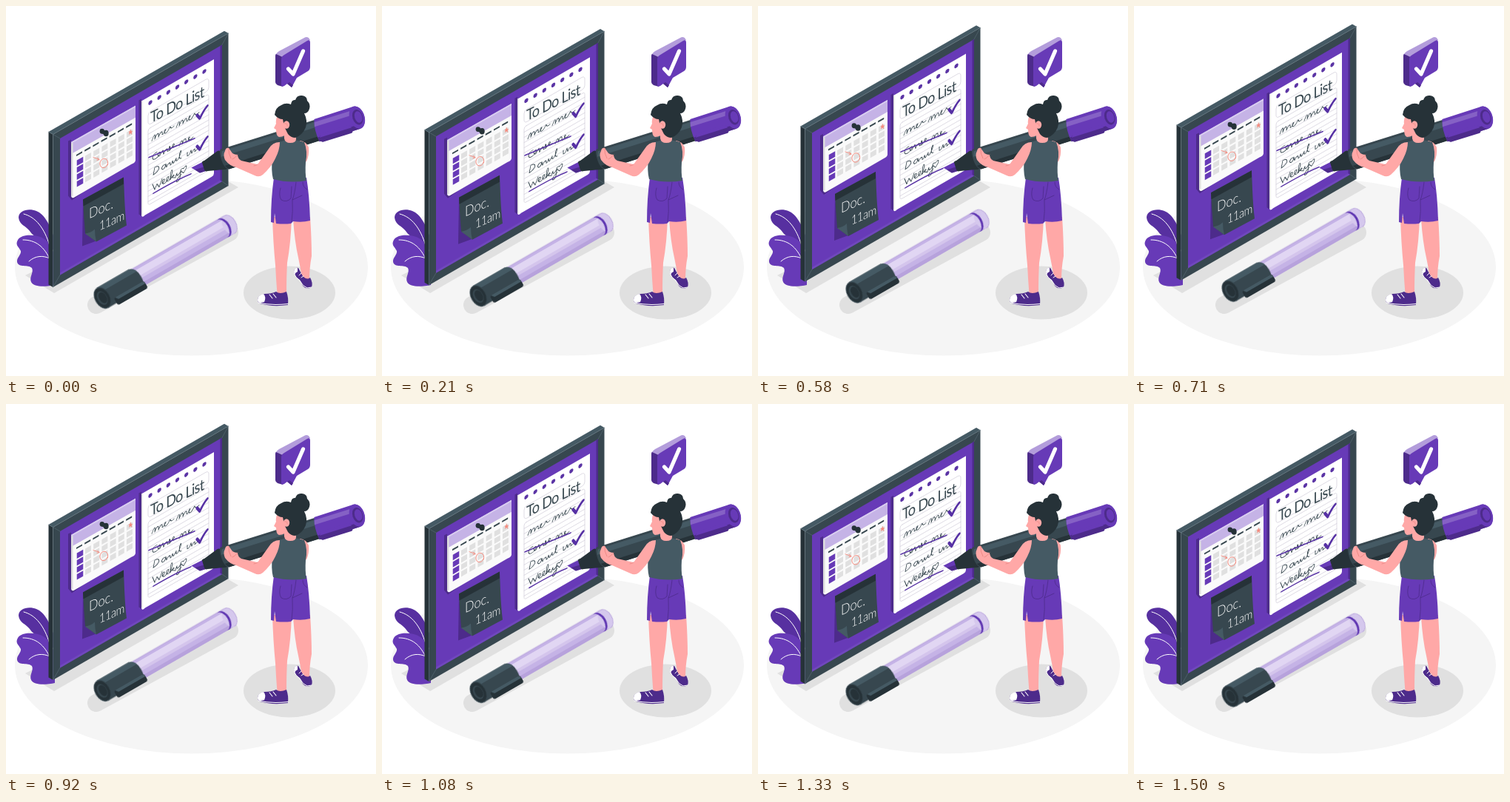
An HTML page for the animation above (1540 ms loop, 500 by 500 pixels).

```html
<!DOCTYPE html>
<html lang="en">
<head>
<meta charset="utf-8">
<title>To Do List</title>
<style>
html, body { margin: 0; height: 100%; overflow: hidden; background: #fff; }
svg { display: block; width: 100vw; height: 100vh; }
.float { animation: float 1540ms linear -40ms infinite; }
@keyframes float {
  50% { transform: translateY(-10px); }
}
.line { fill: none; stroke-linecap: round; stroke-linejoin: round; }
.p { fill: #673ab7; }
.pd { fill: #4d2b8b; }
.g { fill: #37474f; }
.gl { fill: #455a64; }
.gd { fill: #263238; }
.skin { fill: #ffa8a7; }
.shade { fill: #e0e0e0; }
.hand { font-family: Lato, "Open Sans", sans-serif; }
</style>
</head>
<body>
<svg viewBox="0 0 500 500">
  <!-- floor and shadows -->
  <ellipse cx="250.5" cy="353" rx="238.5" ry="119.5" fill="#f5f5f5"/>
  <path class="shade" d="M26 364L65 388L314 245L290 231Z"/>
  <path class="line" d="M122 404L302 306" stroke="#e0e0e0" stroke-width="24"/>
  <ellipse class="shade" cx="383" cy="387.5" rx="62" ry="36"/>

  <!-- plant -->
  <path d="M64 330C54 318 38 314 32 304C27 297 18 296 17 286C17 276 31 273 41 277C52 281 60 297 64 310Z" fill="#5730a0"/>
  <path class="p" d="M66 377C56 379 38 381 34 373C31 366 38 360 35 354C30 349 17 354 15 346C14 340 21 336 20 331C17 325 12 323 16 316C21 309 33 309 43 311C56 314 62 325 66 338Z"/>
  <path class="line" d="M24 281C40 285 52 300 59 324M23 316C40 316 52 325 60 344M31 345C40 337 50 337 59 341" stroke="#fff" stroke-width="1"/>

  <!-- board -->
  <g class="float">
    <path class="gd" d="M57.5 170.5L63.5 174V380.5L57.5 377Z"/>
    <path class="gl" d="M57.5 170.5L295 34.2L300.5 37.4L63.5 174Z"/>
    <path class="g" d="M63.5 174L300.5 37.4V243.5L63.5 380.5Z"/>
    <path class="line" d="M57.5 170.5L63.5 174L300.5 37.4M63.5 174V380.5M63.5 174L73 179.5M300.5 37.4L292 53M63.5 380.5L73 364M292 237.5L300.5 243.5" stroke="#60747e" stroke-width=".5"/>
    <path class="p" d="M73 179.5L292 53V237.5L73 364Z"/>
    <path d="M73 364L292 237.5L289.5 236L73 361Z" fill="#7048bd"/>
    <path class="pd" d="M292 53V237.5L289.5 236V54.5Z"/>

    <!-- calendar -->
    <path class="pd" d="M84 183L88 181V258L103 253L89 263L84 257Z"/>
    <g transform="matrix(1 -.567 0 1 88 184.5)">
      <path d="M0 0H87V74Q86 77 82 76L4 77Q1 77 0 73Z" fill="#fafafa"/>
      <path d="M0 0H87V16H0Z" fill="#c5b3e6"/>
      <path d="M0 0H87V2H0Z" fill="#d9cdf0"/>
      <path d="M0 2H2.5V74L0 73Z" fill="#ddd"/>
      <path d="M7 22H83" fill="none" stroke="#37474f" stroke-width="2.2" stroke-dasharray="8 3.2"/>
      <path d="M19 33H83M19 42.5H83M19 52H83M19 61.5H83" fill="none" stroke="#e0e0e0" stroke-width="7.2" stroke-dasharray="8 3.2"/>
      <path d="M12 29V66" fill="none" stroke="#673ab7" stroke-width="8.5" stroke-dasharray="7.5 2"/>
    </g>
    <g class="line" stroke="#f58a7d" stroke-width=".9">
      <ellipse cx="132.3" cy="213" rx="5.3" ry="6.3" transform="rotate(20 132.3 213)"/>
      <path d="M118 205L126 208M123.5 205.5L126 208L123 209"/>
      <path d="M168.3 167.5L169 170L171 169.5L169.5 171.5L170 174L168.3 172.3L166.3 174L167 171.5L165.8 170.5L167.5 170Z" fill="#f58a7d" stroke-width=".4"/>
    </g>
    <g class="gd">
      <ellipse cx="129.8" cy="169.8" rx="3.2" ry="3.4"/>
      <ellipse cx="135.2" cy="172.5" rx="3.5" ry="4.3"/>
      <path d="M129 167L136 170V176L130 173Z"/>
    </g>

    <!-- sticky note -->
    <path class="pd" d="M104 265L108 309L122 318L103 325Z"/>
    <path class="g" d="M104 262L159 232L160 258Q161 282 163 297L122 319L107 308Q105 285 104 262Z"/>
    <path class="gd" d="M104 262L159 232V241L104.5 271Z"/>
    <path class="gl" d="M107 308Q115 307 120 302Q120 311 122 319Z"/>
    <g class="hand" fill="#fff" font-weight="300">
      <text transform="matrix(.866 -.38 0 1 112 288)" font-size="19">Doc.</text>
      <text transform="matrix(.866 -.38 0 1 126 304)" font-size="17" letter-spacing="-.6">11am</text>
    </g>

    <!-- list -->
    <path class="pd" d="M179.5 128L183 126V284L188 288L179.5 282Z"/>
    <g transform="matrix(1 -.577 0 1 183 129)">
      <path d="M0 0H98V154Q98 157 95 157H5Q0 159 0 153Z" fill="#fff"/>
      <path d="M0 0H1.5V156L0 153Z" fill="#ddd"/>
      <path class="line" d="M12 9H86" stroke="#5b34a5" stroke-width="5.4" stroke-dasharray="0 12.17"/>
      <g class="line" stroke="#cfcbd8" stroke-width=".6">
        <rect x="9" y="21" width="82" height="17" rx="4"/>
        <rect x="9" y="43" width="82" height="103" rx="3"/>
        <path d="M9 50h82m-82 7h82m-82 7h82m-82 7h82m-82 7h82m-82 7h82m-82 7h82m-82 7h82m-82 7h82m-82 7h82m-82 7h82m-82 7h82m-82 7h82m-82 7h82"/>
      </g>
      <g class="line" stroke="#37474f" stroke-width=".9">
        <path d="M14 62C18 54 19 54 18 62C21 55 24 55 23 62C26 56 29 56 28 61C29 63 33 59 33 57C31 56 29 63 34 62C37 61 38 57 39 57C39 60 42 61 44 59M47 63C51 55 52 56 51 63C54 56 57 56 56 63C59 57 62 57 61 62C62 64 66 60 66 58C64 57 62 64 67 63C70 62 71 58 72 58C72 61 75 62 78 60"/>
        <path d="M21 81C14 80 13 89 19 89C25 89 27 83 24 83C21 83 22 89 25 88L29 83L30 89C33 83 36 83 35 88C37 90 40 85 38 83C36 87 42 87 38 89L42 86C45 86 45 83 43 83C41 84 42 90 47 87M51 90C54 83 56 84 55 90C58 83 61 84 60 90C61 92 66 88 65 86C62 85 63 93 70 89"/>
        <path d="M16 109L18 100C26 100 26 108 16 109M32 104C27 103 26 109 30 109C33 108 33 104 33 104L34 109C37 104 39 104 39 109C40 110 42 107 42 105L43 109C45 108 47 105 47 104C46 111 50 108 51 105C54 101 54 97 53 98C51 100 50 109 54 108M62 105L62 110C64 111 66 109 67 105L68 110C71 105 73 105 72 110L77 108"/>
        <path d="M15 121L18 130L21 124L24 130L28 121M28 127C32 127 32 123 30 123C27 124 28 130 32 129C36 128 38 123 36 123C33 123 33 129 37 129C41 126 43 117 41 117C39 117 39 125 39 129C42 124 44 124 44 126L41 127L46 130C47 128 47 126 48 125C47 130 51 130 53 125C53 134 51 138 48 137C46 135 50 131 54 130"/>
        <path d="M57 130C51 124 53 121 57 124C60 120 64 123 57 130Z"/>
      </g>
      <g class="line" stroke="#5630a4">
        <path d="M10 82Q42 87 72 92M16 134Q37 134 49 135T67 137" stroke-width="1.6"/>
        <path d="M75 62L79 69Q84 61 89 58M75 104L79 111Q84 103 89 100" stroke-width="3.4"/>
      </g>
      <text class="hand" transform="matrix(.866 .07 0 1 12 37)" font-size="21" letter-spacing="-.9" fill="#37474f">To Do List</text>
    </g>
  </g>

  <!-- marker on the floor -->
  <g class="float">
    <g transform="translate(130.5 395) rotate(-30)">
      <path d="M50 -14H198A9 14 0 0 1 198 14H50Z" fill="#c5b3e6"/>
      <path d="M50 -10H192Q197 -6 199 -1H50Z" fill="#e1d6f3"/>
      <path d="M50 -1H199V3H50Z" fill="#d4c5ec"/>
      <path d="M50 9H196L192 14H50Z" fill="#b7a2dc"/>
      <ellipse cx="198" rx="9" ry="14" fill="#d5c8ed"/>
      <path d="M50 -14H198A9 14 0 0 1 198 14" class="line" stroke="#ab94d3" stroke-width=".6"/>
      <path d="M186 -14A9 14 0 0 1 186 14H189A9 14 0 0 0 189 -14Z" fill="#5e35b1"/>
      <path class="g" d="M0 -15.5H50Q57 -14 59 -5Q61 7 56 15L0 15.5Z"/>
      <path class="gl" d="M0 -15.5H50Q56 -14 58 -8H4Z"/>
      <ellipse class="g" rx="10.5" ry="15.5"/>
      <ellipse class="gd" rx="9.5" ry="14.3"/>
      <ellipse class="g" cx="-.5" rx="6.5" ry="10"/>
      <ellipse class="gd" cx=".5" rx="5" ry="8"/>
      <rect class="gd" x="13" y="8" width="47" height="11" rx="3"/>
      <path class="gl" d="M15 8H57Q60 9 60 12H18Z"/>
    </g>
  </g>

  <!-- speech bubble -->
  <path class="pd" d="M364 67Q364 64 367 65L374 69V109L367 107Q364 105 364 103Z"/>
  <path d="M365 65Q366 63 369 61L403 43Q406 41 409 43L411 46L374 69Z" fill="#b39ddb"/>
  <path class="p" d="M372 72Q372 68 376 66L407 47Q411 45 411 49V82Q411 86 408 88L393 97L386 110L380 105L376 108Q372 110 372 106Z"/>
  <path class="pd" d="M380 105L386 110L388 107L383 103Z"/>
  <path class="line" d="M381.5 85L388 92L401.5 61" stroke="#fff" stroke-width="5.2"/>

  <!-- big marker -->
  <g transform="translate(251 220.500) rotate(-17.4)">
    <path class="p" d="M0 -2L18 -5V8L9 8Z"/>
    <path class="pd" d="M9 8L18 8V2L4 2Z"/>
    <path class="gd" d="M16 -5Q17 -6 20 -6L40 -13Q47 -14 48 0T44 14L20 9Q16 9 16 6Z"/>
    <path class="g" d="M45 -14H178V15H48Q42 12 42 0T45 -14Z"/>
    <path class="gl" d="M46 -11H178V-4H43Z"/>
    <path class="gd" d="M44 9H178V15H48Z"/>
    <path class="p" d="M178 -15Q173 0 176 16H234A10 15.5 0 0 0 234 -15.5Z"/>
    <path d="M177 -11H230V-5H175.5Z" fill="#8561c5"/>
    <path class="pd" d="M175.500 10H234V16H176Z"/>
    <ellipse class="p" cx="234" rx="10" ry="15.5"/>
    <ellipse class="pd" cx="235" rx="7" ry="10.5"/>
    <ellipse class="p" cx="236" rx="5" ry="8"/>
    <rect class="pd" x="178" y="8" width="45" height="10" rx="3"/>
    <path class="p" d="M180 6H219Q223 7 223 11H178Z"/>
  </g>

  <!-- legs -->
  <path class="skin" d="M388 285H411Q413 315 413 338Q410 353 410 371Q406 377 400 368Q398 354 395 340Q390 318 388 288Z"/>
  <path class="skin" d="M360 285H386Q385 320 380 347Q379 365 379 389H366.5Q365 370 364 350Q361 320 360 285Z"/>
  <path class="pd" d="M389 359Q390 353 395 354L401 365Q407 371 411 367Q415 374 413 380Q406 384 401 378L397 370Q390 367 389 359Z"/>
  <path d="M389 359Q390 353 394 354L394 359Q391 360 390 363Z" fill="#fff"/>
  <path class="line" d="M389 361Q391 367 397 371Q401 379 407 381L413 380M396 364L399 361M399 367L402 365" stroke="#fff" stroke-width="1"/>
  <path class="pd" d="M340 397Q340 391 349 389Q359 389 365 386Q370 390 379 386Q382 394 381 404Q360 407 343 402Q340 400 340 397Z"/>
  <path d="M340 397Q340 391 348 389Q352 393 349 400L343 401Q340 400 340 397Z" fill="#fff"/>
  <path class="line" d="M341 401Q358 405 381 402.500M356 390L360 395M361 389L365 394" stroke="#fff" stroke-width="1.100"/>

  <!-- shorts -->
  <path class="p" d="M362 232H406Q410 255 411 290Q400 293 388 291L385 294Q376 295 365 294L363 280L362 293L358 292Q358 260 362 232Z"/>
  <path class="line" d="M387 262Q388 278 386 292M371 246Q368 256 372 262Q379 266 385 260L386 244M392 238Q390 255 387 262L400 256M401 238Q401 245 407 248" stroke="#4d2b8b" stroke-width=".8"/>

  <!-- arms and body -->
  <path class="skin" d="M397 182Q406 183 409 191Q410 202 406 210L400 214Z"/>
  <path class="gl" d="M368 184Q385 178 403 184Q408 196 405 211Q404 226 406 236Q383 240 361 234Q358 223 360 205Q361 190 368 184Z"/>
  <path class="skin" d="M370 184Q360 184 355 193L340 214L318 209Q313 206 313 201Q309 201 306 199L301 192Q297 191 296 196Q293 201 296 208Q302 216 311 218L336 229Q342 232 347 228Q359 217 364 206Q370 194 370 184Z"/>
  <path class="line" d="M313 201Q309 206 306 207M301 192Q300 199 304 206M340 214Q337 216 335 216" stroke="#e8837f" stroke-width=".8"/>

  <!-- head -->
  <path class="skin" d="M376 165H392V180Q392 185 384 185Q377 185 376 179Z"/>
  <path class="skin" d="M367 147Q364 155 365 159L362 165L365 167Q365 176 369 177Q377 177 382 170L386 148Z"/>
  <path class="gd" d="M363 147Q364 137 372 134Q378 130 385 133Q386 126 391 127Q393 120 400 121Q407 122 407 128Q412 133 410 139Q408 145 403 145Q408 155 405 164Q401 174 391 178Q385 178 381 173L377 165Q375 159 374 153Q368 153 363 147Z"/>
  <ellipse class="skin" cx="379" cy="160.5" rx="4.2" ry="5.2"/>
  <path class="line" d="M377 159Q380 158 380 162" stroke="#e8837f" stroke-width=".7"/>
</svg>
</body>
</html>
```
